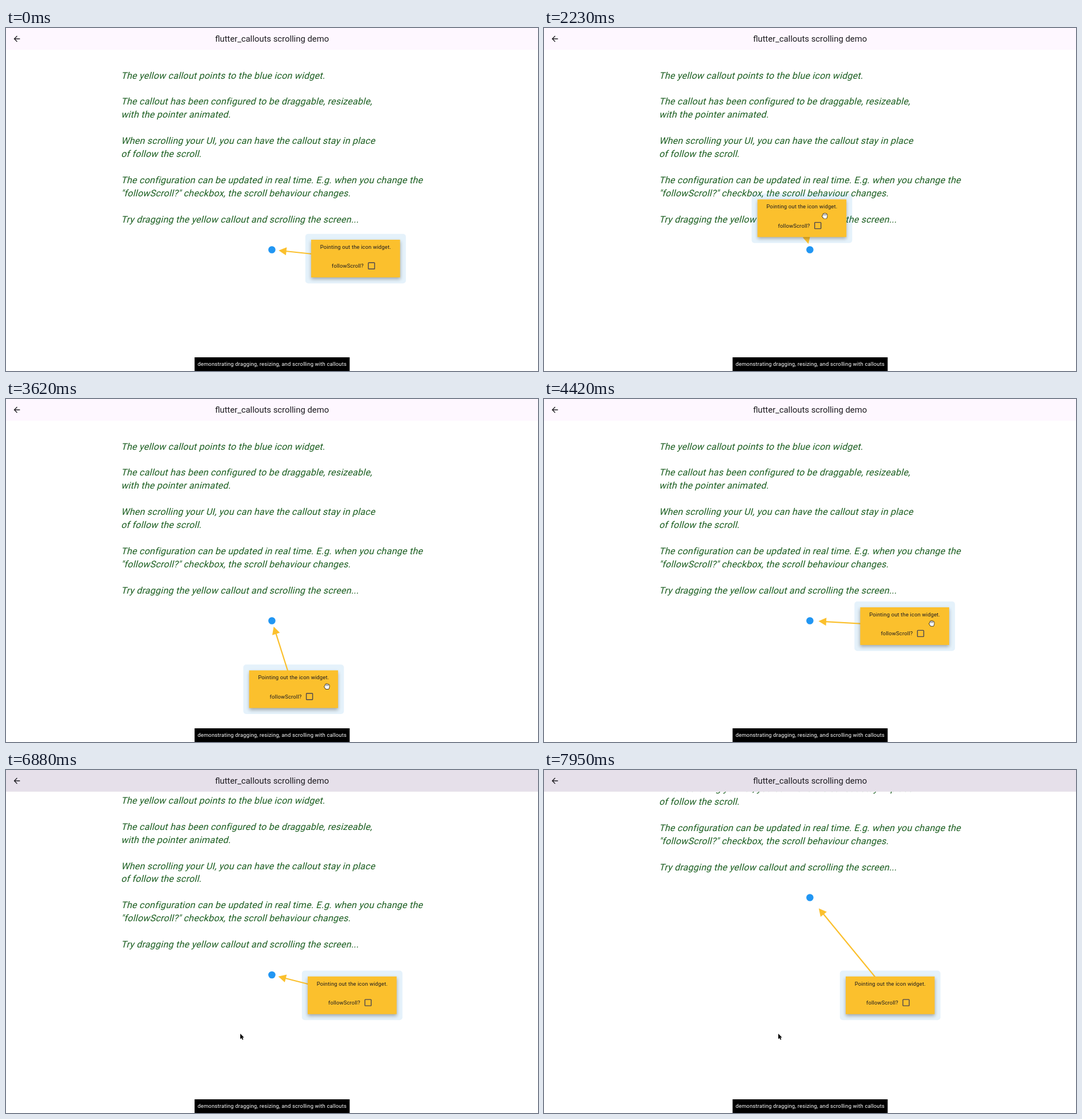
An HTML page with a canvas for the animation above (8 s loop, 931x601 px).

```html
<!DOCTYPE html>
<html lang="en">
<head>
<meta charset="utf-8">
<title>Callout scrolling demo</title>
<style>
html, body { margin: 0; width: 100%; height: 100%; overflow: hidden; background: #fff; }
canvas { display: block; width: 931px; height: 601px; }
</style>
</head>
<body>
<canvas id="stage" width="931" height="601"></canvas>
<script>
const ctx = document.getElementById('stage').getContext('2d');
const W = 931, H = 601, LOOP = 8000, STEP = 78.8;
const FONT = 'Roboto, sans-serif';
const YELLOW = '#fbc02d', INK = '#1d1b20';
const CARD_W = 155.6, CARD_H = 66;
const CHECK = { x: 105.6, y: 45.8 };
const DRAG_START = 980, DRAG_END = 4750, SCROLL_START = 6450;

const COPY = [
  'The yellow callout points to the blue icon widget.',
  '',
  'The callout has been configured to be draggable, resizeable,',
  'with the pointer animated.',
  '',
  'When scrolling your UI, you can have the callout stay in place',
  'of follow the scroll.',
  '',
  'The configuration can be updated in real time. E.g. when you change the',
  '"followScroll?" checkbox, the scroll behaviour changes.',
  '',
  'Try dragging the yellow callout and scrolling the screen...'
];

// Turning points of the drag: time, left, top.
const DRAG = [
  [DRAG_START, 534, 371], [1587, 530.8, 344.3], [1757, 527.5, 323], [2150, 400, 300],
  [2640, 222, 312], [2848, 223.2, 330.7], [3483, 337, 470], [3636, 425.5, 475.5],
  [4150, 573, 372], [DRAG_END, 528, 361.8]
];

const clamp = (v, lo, hi) => Math.min(hi, Math.max(lo, v));

function ease(t, from, to) {
  const u = clamp((t - from) / (to - from), 0, 1);
  return u * u * (3 - 2 * u);
}

const glide = (a, b, k) => ({ x: a.x + (b.x - a.x) * k, y: a.y + (b.y - a.y) * k });

// Monotone cubic through one column of the key points.
function sample(keys, time, col) {
  const last = keys.length - 1;
  const t = clamp(time, keys[0][0], keys[last][0]);
  let i = 0;
  while (i < last - 1 && keys[i + 1][0] < t) i++;
  const slope = k => (keys[k + 1][col] - keys[k][col]) / (keys[k + 1][0] - keys[k][0]);
  const tangent = k => {
    if (k === 0 || k === last) return 0;
    const a = slope(k - 1), b = slope(k);
    return a * b > 0 ? 2 * a * b / (a + b) : 0;
  };
  const d = keys[i + 1][0] - keys[i][0], u = (t - keys[i][0]) / d, v = 1 - u;
  return keys[i][col] * v * v * (1 + 2 * u) + keys[i + 1][col] * u * u * (3 - 2 * u)
    + d * u * v * (v * tangent(i) - u * tangent(i + 1));
}

const cardAt = t => ({ x: sample(DRAG, t, 1), y: sample(DRAG, t, 2) });

const scrollAt = t => 165 * (Math.max(0, t - SCROLL_START) / 1520) ** 1.33;

function cursorAt(t) {
  // The dragged card trails the hand slightly.
  const card = cardAt(t + 22);
  const held = { x: card.x + 127.5, y: card.y + 28.5 };
  if (t < DRAG_START) return glide({ x: 765, y: 540 }, held, ease(t, 180, 900));
  const overCheck = glide(held, { x: 633.5, y: 416 }, ease(t, 5310, 5650));
  return glide(overCheck, { x: 410, y: 462 }, ease(t, 5930, 6480));
}

function text(str, x, y, size, color, align = 'left', spacing = 0.168) {
  ctx.font = `${size}px ${FONT}`;
  ctx.letterSpacing = spacing + 'px';
  ctx.textAlign = align;
  ctx.fillStyle = color;
  ctx.fillText(str, x, y);
}

function slanted(str, x, y, size, color) {
  ctx.save();
  ctx.transform(1, 0, -0.25, 1, x, y);
  text(str, 0, 0, size, color);
  ctx.restore();
}

function disc(x, y, r, color) {
  ctx.fillStyle = color;
  ctx.beginPath();
  ctx.arc(x, y, r, 0, Math.PI * 2);
  ctx.fill();
}

function drawPage(icon, scroll) {
  ctx.fillStyle = '#fff';
  ctx.fillRect(0, 0, W, H);
  COPY.forEach((line, row) => slanted(line, 201.2, 88.5 + row * 22.91 - scroll, 16.18, '#1b5e20'));
  disc(icon.x, icon.y, 6.3, '#2196f3');
}

const BACK = new Path2D('M20 11H7.83l5.59-5.59L12 4l-8 8 8 8 1.41-1.41L7.83 13H20v-2z');

function drawHeader(scrolled) {
  ctx.fillStyle = scrolled ? '#e6e0ea' : '#fef7ff';
  ctx.fillRect(0, 0, W, 38);
  ctx.save();
  ctx.translate(10.9, 10.9);
  ctx.scale(0.674, 0.674);
  ctx.fillStyle = INK;
  ctx.fill(BACK);
  ctx.restore();
  text('flutter_callouts scrolling demo', 465.5, 23.7, 14.83, INK, 'center', 0);
}

// The tip keeps further from the icon as the arrow gets longer.
function drawArrow(from, target) {
  const dx = from.x - target.x, dy = from.y - target.y;
  const length = Math.hypot(dx, dy);
  const gap = 10.7 + Math.max(0, length - 140) * 0.17;
  ctx.save();
  ctx.translate(target.x, target.y);
  ctx.rotate(Math.atan2(dy, dx));
  ctx.fillStyle = YELLOW;
  ctx.fillRect(gap + 12, -1.1, length - gap - 12, 2.2);
  ctx.beginPath();
  ctx.moveTo(gap, 0);
  ctx.lineTo(gap + 13.5, -7);
  ctx.lineTo(gap + 13.5, 7);
  ctx.fill();
  ctx.restore();
}

function drawCallout({ x, y }, icon, hover) {
  const midX = x + CARD_W / 2;
  ctx.fillStyle = 'rgba(25,135,215,0.11)';
  ctx.beginPath();
  ctx.roundRect(x - 10.2, y - 10.3, CARD_W + 20.4, CARD_H + 20.8, 5);
  ctx.fill();
  drawArrow({ x: midX, y: y + CARD_H / 2 }, icon);

  ctx.save();
  ctx.shadowColor = 'rgba(0,0,0,0.3)';
  ctx.shadowBlur = 6;
  ctx.shadowOffsetY = 3;
  ctx.fillStyle = YELLOW;
  ctx.fillRect(x, y, CARD_W, CARD_H);
  ctx.restore();

  text('Pointing out the icon widget.', midX, y + 15.8, 9.44, INK, 'center');
  text('followScroll?', x + 36, y + 49.2, 9.44, INK);
  if (hover) disc(x + CHECK.x, y + CHECK.y, 13.5, 'rgba(29,27,32,0.09)');
  ctx.strokeStyle = hover ? INK : '#49454f';
  ctx.lineWidth = 1.4;
  ctx.beginPath();
  ctx.roundRect(x + CHECK.x - 5.5, y + CHECK.y - 5.5, 11, 11, 0.8);
  ctx.stroke();
}

const CURSORS = {
  arrow: new Path2D('M0 0V9.4L2.2 7.4L3.7 10.8L5.3 10.1L3.8 6.8H6.6Z'),
  grab: new Path2D('M-3 -2.4Q-2.6 -4 -1.4 -3.4Q-.4 -4.8 .7 -3.7Q2 -4.4 2.6 -3Q4.2 -3.2 4.2 -1.6V1Q3.8 2.6 3 4.6H-1.8Q-2.8 2.8 -4.4 1Q-4.8 -.4 -3 -.2Z'),
  hand: new Path2D('M-1 .8Q0 -.8 1 .8V4Q2.4 3.2 3 4.4Q4.4 3.8 4.8 5Q6.4 4.8 6.2 6.6Q6.2 8.4 5 10.8H.4Q-.6 8.8 -2.6 6.8Q-2.6 5 -1 6.2Z')
};

function drawCursor(pos, kind) {
  const isArrow = kind === 'arrow', shape = CURSORS[kind];
  ctx.save();
  ctx.translate(pos.x, pos.y);
  ctx.lineJoin = 'round';
  ctx.lineWidth = 1.4;
  ctx.strokeStyle = isArrow ? '#fff' : '#111';
  ctx.fillStyle = isArrow ? '#000' : '#fff';
  ctx.stroke(shape);
  ctx.fill(shape);
  if (!isArrow) {
    const [left, top] = kind === 'hand' ? [1, 4.6] : [-1.2, -3.2];
    ctx.lineWidth = 0.6;
    ctx.beginPath();
    for (let i = 0; i < 3; i++) {
      ctx.moveTo(left + i * 1.8, top);
      ctx.lineTo(left + i * 1.8, top + 2.6);
    }
    ctx.stroke();
  }
  ctx.restore();
}

function drawCaption() {
  ctx.fillStyle = '#000';
  ctx.fillRect(330, 577, 271.4, 24);
  text('demonstrating dragging, resizing, and scrolling with callouts', 465.6, 592.4, 9.44, '#fff', 'center');
}

function render(t) {
  const scroll = scrollAt(t);
  const icon = { x: 465.3, y: 388.5 - scroll };
  const card = cardAt(t);
  const cursor = cursorAt(t);
  const dx = cursor.x - card.x, dy = cursor.y - card.y;
  const onCheck = Math.hypot(dx - CHECK.x, dy - CHECK.y) < 13.5;
  const onCard = dx > 0 && dx < CARD_W && dy > 0 && dy < CARD_H;

  drawPage(icon, scroll);
  drawHeader(scroll > 0);
  drawCallout(card, icon, onCheck);
  drawCaption();
  if (t > 180) drawCursor(cursor, onCheck ? 'hand' : onCard ? 'grab' : 'arrow');
}

// The picture advances in even steps, like a screen recording.
const stepTime = t => 90 + STEP * Math.floor((t - 90) / STEP + 0.3);

function tick() {
  render(stepTime(performance.now() % LOOP));
  requestAnimationFrame(tick);
}
tick();
</script>
</body>
</html>
```
